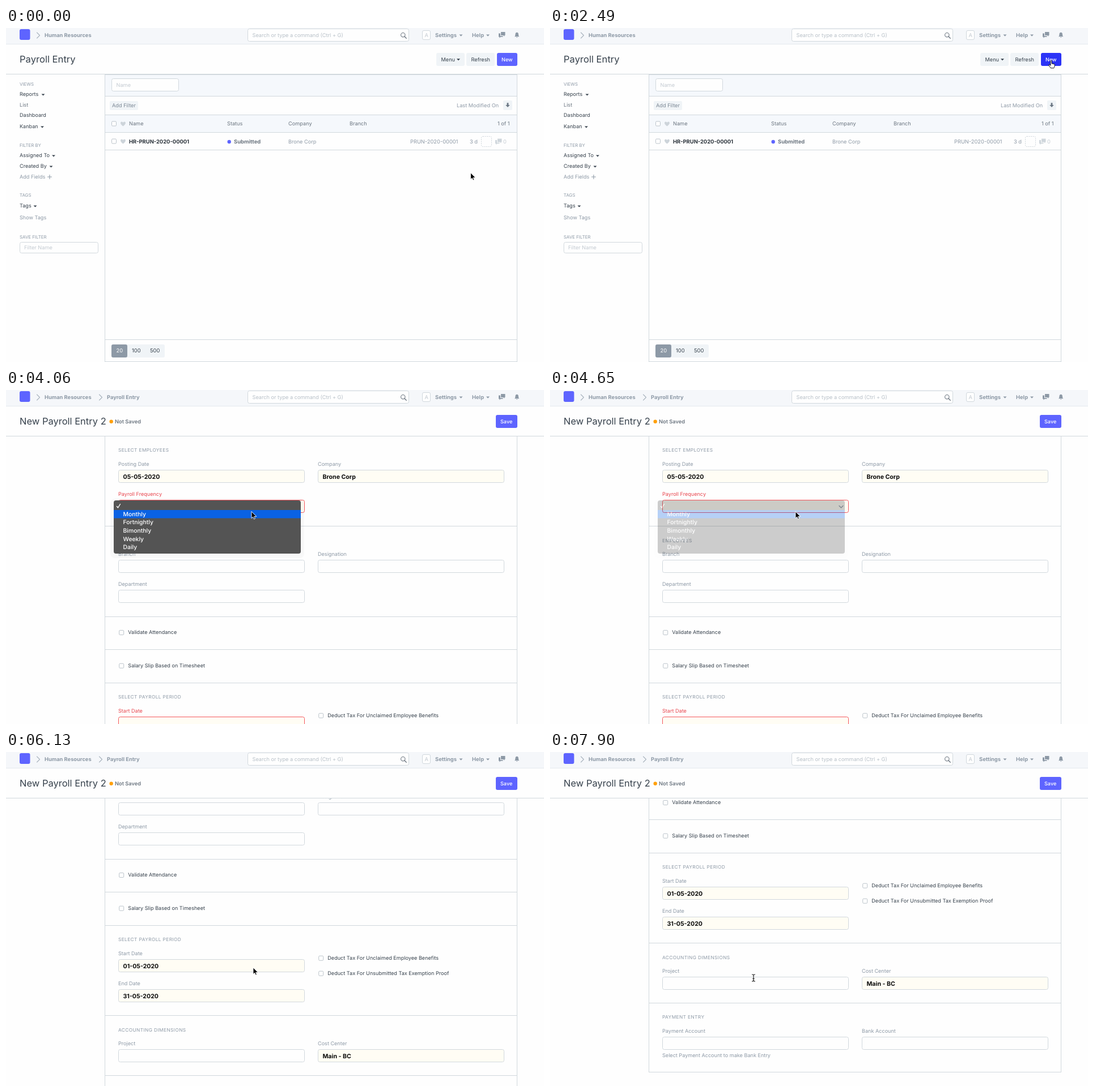
Recreate the animation shown at these times as an HTML page. Size 949 by 590 pixels, loop 8 s.

```html
<!DOCTYPE html>
<html lang="en">
<head>
<meta charset="utf-8">
<title>Payroll Entry</title>
<style>
  html, body { margin: 0; width: 100%; height: 100%; overflow: hidden; background: #fefefe; }
  svg { display: block; width: 949px; height: 590px; }
  text { font-family: Inter, "Open Sans", sans-serif; white-space: pre; text-rendering: geometricPrecision; }
</style>
</head>
<body>
<svg id="stage" viewBox="0 0 949 590" xmlns="http://www.w3.org/2000/svg"></svg>
<script>
const NS = 'http://www.w3.org/2000/svg';
const LOOP = 8000;
const GRAY = '#8d99a6', DARK = '#36414c', LINE = '#d1d8dd', PALE = '#c3cad1',
      BLUE = '#5e64ff', RED = '#e8444c', CREAM = '#fffdf4', SOFT = '#f0f4f7', WHITE = '#fefefe';
const COMPANY = 'Brone Corp';
const stage = document.getElementById('stage');

function el(parent, tag, attrs = {}) {
  const node = document.createElementNS(NS, tag);
  for (const key in attrs) node.setAttribute(key, attrs[key]);
  return parent.appendChild(node);
}
const group = (parent, attrs) => el(parent, 'g', attrs);

// cy is the middle of the capitals
function text(parent, str, x, cy, fill = DARK, size = 9.1, weight = 400, extra = {}) {
  const node = el(parent, 'text', { x, y: cy + size * 0.36, fill, 'font-size': size, 'font-weight': weight, ...extra });
  node.textContent = str;
  return node;
}
const rect = (parent, x, y, width, height, fill, rx = 0, stroke = 'none') =>
  el(parent, 'rect', { x, y, width, height, fill, rx, stroke });
const path = (parent, d, fill = 'none', stroke = 'none', width = 1) =>
  el(parent, 'path', { d, fill, stroke, 'stroke-width': width, 'stroke-linejoin': 'round', 'stroke-linecap': 'round' });
const rule = (parent, y, x1 = 174, x2 = 902, color = LINE) => rect(parent, x1, y, x2 - x1, 1, color);
const caret = (parent, x, y, color = DARK) => path(parent, `M${x - 3} ${y - 1.4}h6l-3 3.2z`, color);
const check = (parent, x, y) => rect(parent, x - 4, y - 4, 8, 8, WHITE, 1.5, '#bcc4cb');
const chevron = (parent, x, y) => path(parent, `M${x - 2.5} ${y - 5}l5 5-5 5`, 'none', '#aab4be', 1.1);
const heart = (parent, x, y) =>
  path(parent, `M${x} ${y + 4}c-6-4-5-8-2.4-8q1.7 0 2.4 1.6q.7-1.6 2.4-1.6c2.6 0 3.6 4-2.4 8z`, '#cdd4da');

function chat(parent, x, y, color) {
  path(parent, `M${x + 4} ${y}h7.5v6h-1.2v2l-2-2h-4.3z`, color);
  path(parent, `M${x} ${y + 2.5}h3v4.6h4.5v1.6h-4l-2 2v-2h-1.5z`, color);
}

// ---- list page ----
const list = group(stage);
rect(list, 174, 82, 728, 39, '#f5f8fc');
rect(list, 174, 154, 728, 31, '#f5f8fc');
rect(list, 174.5, 82.5, 727, 507, 'none', 0, LINE);
[120, 153, 184, 215, 550].forEach(y => rule(list, y));
rect(list, 186.5, 89.5, 118, 22, WHITE, 3, LINE);
text(list, 'Name', 194.5, 101, PALE, 9.2);
rect(list, 183, 129, 50, 16, SOFT, 2);
text(list, 'Add Filter', 187, 137, '#7b8794', 9.2);
text(list, 'Last Modified On', 795, 137, GRAY, 9.2);
rect(list, 877, 128, 16, 17, SOFT, 2);
path(list, 'M883.6 132.3h2.8v3.7h2.4l-3.8 4-3.8-4h2.4z', '#6c7885');

[[169, 'Name', 217], [169, 'Status', 390], [169, 'Company', 498], [169, 'Branch', 606], [169, '1 of 1', 867]]
  .forEach(([y, s, x]) => text(list, s, x, y, '#6c7680', 9.2));
[169, 200].forEach(y => { check(list, 190.5, y); heart(list, 206.5, y + .5); });
text(list, 'HR-PRUN-2020-00001', 217, 200.7, '#2b333b', 9.4, 700);
el(list, 'circle', { cx: 393.7, cy: 201, r: 3.2, fill: BLUE });
text(list, 'Submitted', 402, 200.7, '#6c7680', 9.4, 700);
text(list, COMPANY, 498, 200.7, GRAY, 9.15);
text(list, 'PRUN-2020-00001', 713, 200.7, GRAY, 9.3);
text(list, '3 d', 818, 200.7, GRAY, 9.3);
rect(list, 838.5, 191.5, 18, 18, 'none', 2.5, '#cfd6dc').setAttribute('stroke-dasharray', '2 1.5');
chat(list, 863, 195.5, '#cfd6dc');
text(list, '0', 877, 200.7, '#c5ccd3', 9.3);

rect(list, 186, 559, 94, 23, SOFT, 3);
rect(list, 186, 559, 28, 23, GRAY, 3);
text(list, '20', 194.5, 570, '#fff', 9.3);
text(list, '100', 222, 570, DARK, 9.3);
text(list, '500', 254, 570, DARK, 9.3);

[['VIEWS', 99], ['FILTER BY', 207], ['TAGS', 295.5], ['SAVE FILTER', 369.5]]
  .forEach(([s, y]) => text(list, s, 24, y, GRAY, 7.85));
[['Reports', 117, 65.5], ['Kanban', 174, 64], ['Assigned To', 225, 84], ['Created By', 244, 79.5], ['Tags', 314, 51.5]]
  .forEach(([s, y, x]) => { text(list, s, 24, y); caret(list, x, y + .8); });
text(list, 'Dashboard', 24, 154);
text(list, 'List', 24, 135.5, '#6c7680');
text(list, 'Add Fields', 24, 262.5, GRAY);
path(list, 'M73.5 263h7M77 259.500v7', 'none', GRAY, 1.1);
text(list, 'Show Tags', 24, 335, GRAY);
rect(list, 24.5, 378.5, 138, 19, WHITE, 3, LINE);
text(list, 'Filter Name', 32, 388, PALE, 9.2);

// ---- form page ----
const form = group(stage);
const clip = el(el(stage, 'defs'), 'clipPath', { id: 'body' });
rect(clip, 0, 82, 949, 508, '#000');
const sheet = group(group(form, { 'clip-path': 'url(#body)' }));
rect(sheet, 174.5, 40.5, 727, 864, 'none', 0, LINE);
[240, 400, 458, 517, 676, 782].forEach(y => rule(sheet, y));

const LEFT = 198, RIGHT = 550;
function field(name, x, labelY, value, filled) {
  const label = text(sheet, name, x, labelY, GRAY);
  const box = rect(sheet, x + .5, labelY + 10.5, 328, 22, filled ? CREAM : WHITE, 3, LINE);
  const val = text(sheet, value, x + 8.5, labelY + 22, '#0b0b0b', 10.6, 700);
  return { label, box, val };
}
function option(name, x, y) {
  check(sheet, x + 5.7, y + .5);
  text(sheet, name, x + 17.3, y);
}
[['SELECT EMPLOYEES', 106], ['EMPLOYEES', 266], ['SELECT PAYROLL PERIOD', 542],
 ['ACCOUNTING DIMENSIONS', 701.7], ['PAYMENT ENTRY', 807.5]]
  .forEach(([s, y]) => text(sheet, s, LEFT, y, GRAY, 8.3, 400, { 'letter-spacing': .4 }));
field('Posting Date', LEFT, 131, '05-05-2020', true);
field('Company', RIGHT, 131, COMPANY, true);
const frequency = field('Payroll Frequency', LEFT, 184, 'Monthly', true);
path(sheet, 'M510 204.500l3.500 3.500 3.500-3.500', 'none', GRAY, 1.4);
field('Branch', LEFT, 290, '');
field('Designation', RIGHT, 290, '');
field('Department', LEFT, 343, '');
option('Validate Attendance', LEFT, 428);
option('Salary Slip Based on Timesheet', LEFT, 486.7);
const start = field('Start Date', LEFT, 567, '01-05-2020', true);
const end = field('End Date', LEFT, 620, '31-05-2020', true);
option('Deduct Tax For Unclaimed Employee Benefits', RIGHT, 574.7);
option('Deduct Tax For Unsubmitted Tax Exemption Proof', RIGHT, 601.7);
field('Project', LEFT, 726, '');
field('Cost Center', RIGHT, 726, 'Main - BC', true);
field('Payment Account', LEFT, 832, '');
field('Bank Account', RIGHT, 832, '');
text(sheet, 'Select Payment Account to make Bank Entry', LEFT, 874.5, GRAY);

function setField(f, missing) {
  f.label.setAttribute('fill', missing ? RED : GRAY);
  f.box.setAttribute('stroke', missing ? '#f4565c' : LINE);
  show(f.val, !missing);
}

// ---- page heads ----
rule(stage, 81, 0, 949);
text(list, 'Payroll Entry', 24, 55.5, DARK, 16.6);
rect(list, 759, 44, 50, 23, SOFT, 3);
text(list, 'Menu', 767.5, 55.3, DARK, 9.2);
caret(list, 798, 55.7);
rect(list, 812, 44, 50, 23, SOFT, 3);
text(list, 'Refresh', 820.5, 55.3, DARK, 9.2);
const newButton = rect(list, 866, 44, 36, 23, BLUE, 3);
text(list, 'New', 874, 55.3, '#fff', 9.1, 500);

text(form, 'New Payroll Entry 2', 24, 55.5, DARK, 16.5);
el(form, 'circle', { cx: 185.7, cy: 55.7, r: 3.2, fill: '#ffa00a' });
text(form, 'Not Saved', 192, 55.3, '#6c7680', 9.25, 600);
rect(form, 864, 44, 38, 23, BLUE, 3);
text(form, 'Save', 872, 55.3, '#fff', 9.1, 500);

// ---- top bar ----
const bar = group(stage);
rect(bar, 0, 0, 949, 28, '#f5f7fa');
rule(bar, 28, 0, 949, '#e4e9ee');
rect(bar, 24, 2, 18.5, 19, BLUE, 3);
chevron(bar, 57, 13);
text(bar, 'Human Resources', 68, 13, GRAY, 9.3, 700);
const crumb = group(bar);
chevron(crumb, 167, 13);
text(crumb, 'Payroll Entry', 178, 13, GRAY, 9.3, 700);
rect(bar, 426.5, 1.5, 284, 22, WHITE, 3, LINE);
text(bar, 'Search or type a command (Ctrl + G)', 434.5, 13, '#b8c0c8', 9.2);
el(bar, 'circle', { cx: 700.3, cy: 12.2, r: 3.7, fill: 'none', stroke: '#6c7680', 'stroke-width': 1.1 });
path(bar, 'M703 15l3.200 3.200', 'none', '#6c7680', 1.4);
rect(bar, 734.5, 4.5, 14, 16, WHITE, 2.5, LINE);
text(bar, 'A', 738.5, 12.7, PALE, 9.3);
text(bar, 'Settings', 757, 12.5, GRAY, 9.4, 700);
caret(bar, 802.5, 13, GRAY);
text(bar, 'Help', 822, 12.5, GRAY, 9.4, 700);
caret(bar, 850, 13, GRAY);
chat(bar, 869, 7, GRAY);
path(bar, 'M897 15.300q1.500-1.300 1.500-4.300q0-3 2.700-3.300q2.700.3 2.700 3.300q0 3 1.500 4.300zM900 16h2.400q-1.200 2-2.400 0z', GRAY);

// ---- drop-down ----
const menu = group(stage);
rect(menu, 184, 192, 342, 105, 'rgba(0,0,0,.025)', 8);
rect(menu, 190, 195, 330, 94, '#545454', 4);
const highlight = rect(menu, 190, 212, 330, 14.5, '#0a62e4');
path(menu, 'M195.500 205.500l2 2.500 4-6.500', 'none', '#fff', 1.4);
['Monthly', 'Fortnightly', 'Bimonthly', 'Weekly', 'Daily']
  .forEach((s, i) => text(menu, s, 206.5, 219 + i * 14.6, '#fff', 10.4, 500));

// ---- pointer ----
const pointer = group(stage);
const ring = el(pointer, 'circle', { r: 7, cx: 1, cy: 0, fill: 'none', stroke: '#8a8a8a', 'stroke-width': 1 });
const shapes = {
  arrow: path(pointer, 'M0 0v11.600l2.700-2.500 1.700 4 2-.9-1.700-3.800h3.700z', '#000', '#fff', .9),
  hand: path(pointer, 'M-1.200.8q0-1.300 1.100-1.300t1.100 1.300v4l4 .8q1.500.4 1.300 2l-.7 3.200q-.2.900-.8 2h-5.500l-3.500-5q-.6-1.200.6-1.400l2.400 1.600z', '#fff', '#000', .9),
  beam: path(pointer, 'M-2.500-6q2.500 0 2.500 1.500v9q0 1.500-2.500 1.500M2.500-6q-2.500 0-2.500 1.500v9q0 1.500 2.500 1.500M-1.300 1.500h2.600', 'none', '#111', 1.1)
};

// ---- timeline ----
const moves = [
  [0, 819.5, 256, 'arrow'],
  [1650, 823, 244, 'arrow'], [1820, 838, 196, 'arrow'], [1990, 858, 136, 'arrow'],
  [2150, 874, 88, 'arrow'], [2320, 882, 63, 'hand'], [2490, 884, 58, 'hand'],
  [3170, 543, 141, 'arrow'], [3460, 468, 191, 'arrow'], [3610, 433, 215, 'arrow'],
  [4800, 433, 224, 'arrow'], [4940, 434, 262, 'arrow'], [5090, 435, 318, 'arrow'],
  [5240, 436, 359, 'arrow'], [5380, 436, 377, 'arrow'], [5530, 436, 381, 'arrow'],
  [6420, 414, 379, 'arrow'], [6570, 376, 374, 'arrow'], [6720, 348, 370, 'arrow'], [6860, 338, 369, 'arrow'],
  [7010, 345, 381, 'arrow'], [7150, 355, 394, 'beam'], [7300, 359, 399, 'beam']
];
const scrolls = [[0, 0], [5830, 62], [5980, 146], [6130, 211], [6270, 237], [6420, 247], [6570, 250], [7750, 302], [7900, 339]];
const fades = [[0, 0], [4060, 1], [4650, .29], [4800, 0]];
const clicks = [[750, 900], [2880, 3020], [3910, 4060]];

const at = (steps, t) => steps.findLast(step => step[0] <= t);
const show = (node, on) => node.setAttribute('visibility', on ? 'inherit' : 'hidden');

function draw(t) {
  const onForm = t >= 3020;
  show(list, !onForm);
  show(form, onForm);
  show(crumb, onForm);
  newButton.setAttribute('fill', t >= 2320 ? '#2b33f7' : BLUE);

  setField(frequency, t < 4800);
  setField(start, t < 4940);
  setField(end, t < 4940);
  sheet.setAttribute('transform', `translate(0 ${-at(scrolls, t)[1]})`);

  menu.setAttribute('opacity', at(fades, t)[1]);
  show(highlight, t < 4500 || t >= 4650);

  const [, x, y, kind] = at(moves, t);
  pointer.setAttribute('transform', `translate(${x} ${y})`);
  for (const name in shapes) show(shapes[name], name === kind);
  show(ring, clicks.some(([from, to]) => t >= from && t < to));
}

const begin = performance.now();
function tick() {
  draw((performance.now() - begin) % LOOP);
  requestAnimationFrame(tick);
}
tick();
</script>
</body>
</html>
```
